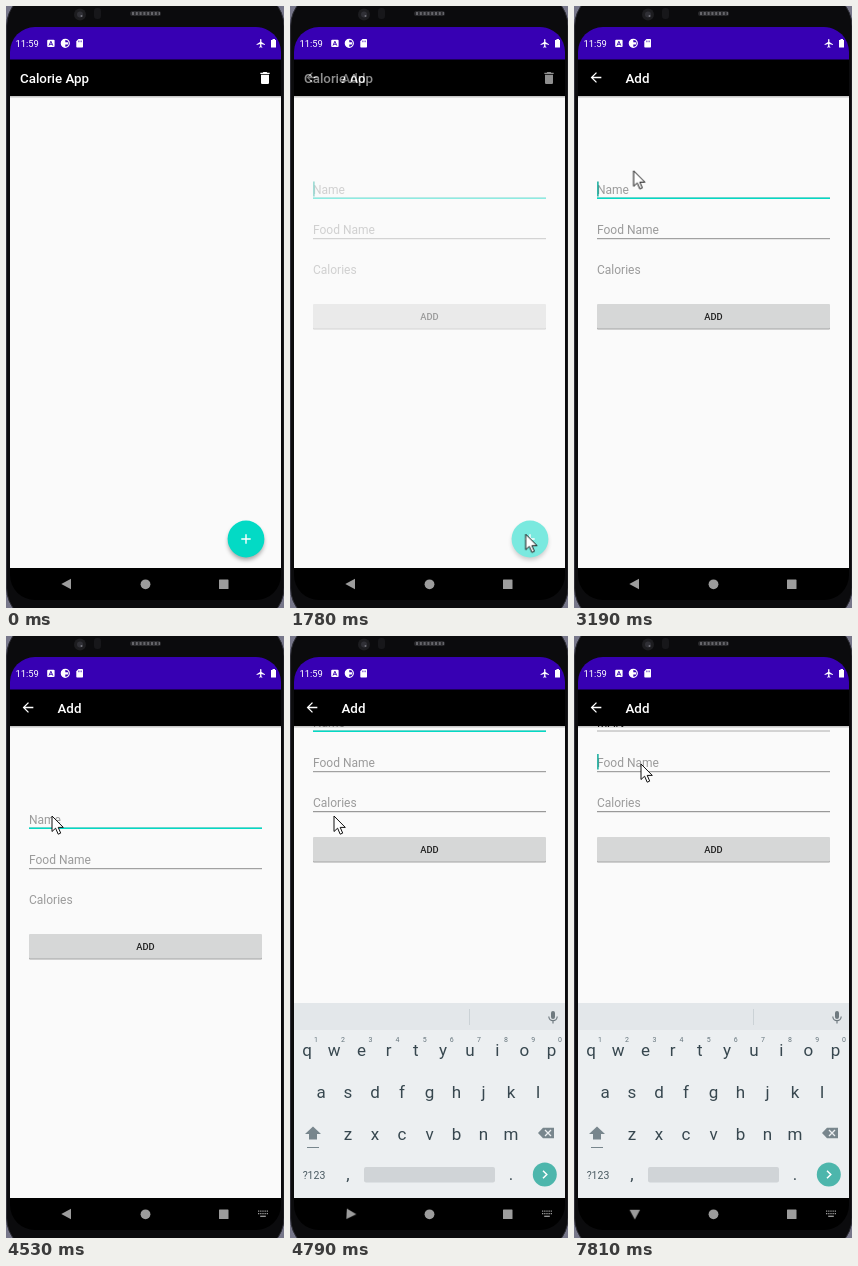
Write an HTML page that moves like this. It is 278 px wide and 602 px high and loops after 8000 ms.

```html
<!DOCTYPE html>
<html lang="en">
<head>
<meta charset="utf-8">
<title>Calorie App</title>
<style>
html, body { margin: 0; width: 100%; height: 100%; overflow: hidden; background: #0b0b0d; }
svg { display: block; width: 278px; height: 602px; font-family: Roboto, "Open Sans", sans-serif; }
.title { font-size: 13.33px; font-weight: 500; fill: #fff; }
.field { font-size: 12px; fill: #9b9b9b; }
.typed { font-size: 12px; fill: #212121; }
.mid { text-anchor: middle; }
.key { font-size: 17px; fill: #37474f; text-anchor: middle; }
.hint { font-size: 7px; fill: #66757d; text-anchor: middle; }
.word { font-size: 12px; fill: #6f7a80; text-anchor: middle; }

/* one loop is 8 s, so 1% is 80 ms */
.a { animation: 8s linear infinite; }
.s { animation: 8s step-end infinite; }
.mouse { animation-name: mouse; }
.press { animation-name: press; transform-origin: 240px 533px; }
.add { animation-name: add; }
.scroll { animation-name: scroll; }
.board { animation-name: board; }
.back { animation-name: back; transform-origin: 60.8px 578px; }
.ime { animation-name: ime; }
.blink { animation-name: blink; }
.blink2 { animation-name: blink2; }
.line3 { animation-name: line3; }
.focus { animation-name: focus; }
.name { animation-name: name; }
.t1 { animation-name: t1; }
.t2 { animation-name: t2; }
.t3 { animation-name: t3; }
.w1 { animation-name: w1; }
.w2 { animation-name: w2; }
.w3 { animation-name: w3; }
.dots { animation-name: dots; }

@keyframes mouse {
  0%, 5.5% { transform: translate(246px, 579px); opacity: 0; }
  5.6% { transform: translate(246px, 579px); opacity: 1; }
  7.6% { transform: translate(236px, 549px); }
  9.8% { transform: translate(226px, 523px); }
  11.5% { transform: translate(234px, 531px); }
  13%, 21.4% { transform: translate(239px, 537px); animation-timing-function: ease-in-out; }
  27.1%, 31.3% { transform: translate(167px, 346px); animation-timing-function: ease-in-out; }
  40.7% { transform: translate(58px, 162px); }
  43.2%, 55.7% { transform: translate(63px, 173px); }
  56.5% { transform: translate(46px, 180px); }
  57.4% { transform: translate(46px, 180px); }
  58.5%, 91% { transform: translate(44px, 180px); animation-timing-function: ease-in-out; }
  97.4%, 100% { transform: translate(67px, 128px); opacity: 1; }
}
@keyframes press {
  0%, 18% { transform: scale(.3); opacity: 0; }
  18.1% { transform: scale(.75); opacity: .25; }
  20.6% { transform: scale(1); opacity: .25; }
  23%, 100% { transform: scale(1); opacity: 0; }
}
@keyframes add { 0%, 21.2% { opacity: 0; } 23.6%, 100% { opacity: 1; } }
@keyframes scroll {
  0%, 58.2% { transform: translateY(0); }
  59.2%, 100% { transform: translateY(-97px); }
}
@keyframes board {
  0%, 57.2% { transform: translateY(196px); animation-timing-function: ease-out; }
  59.7%, 100% { transform: translateY(0); }
}
@keyframes back {
  0%, 57.5% { transform: rotate(0deg); }
  59.9% { transform: rotate(184deg); }
  62.4%, 100% { transform: rotate(270deg); }
}
@keyframes ime { 0% { opacity: 0; } 49.8% { opacity: 1; } }
@keyframes blink {
  0% { opacity: 1; } 31.3% { opacity: 0; } 37.5% { opacity: 1; } 43.2% { opacity: 0; }
  49.1% { opacity: 1; } 55.7% { opacity: 0; } 62.4% { opacity: 1; } 65% { opacity: 0; }
}
@keyframes blink2 { 0% { opacity: 0; } 95% { opacity: 1; } }
@keyframes line3 { 0% { opacity: 0; } 57.4% { opacity: 1; } }
@keyframes focus { 0% { opacity: 1; } 95% { opacity: 0; } }
@keyframes name { 0% { opacity: 1; } 64.9% { opacity: 0; } }
@keyframes t1 { 0% { opacity: 0; } 64.9% { opacity: 1; } 71.6% { opacity: 0; } }
@keyframes t2 { 0% { opacity: 0; } 71.6% { opacity: 1; } 84.2% { opacity: 0; } }
@keyframes t3 { 0% { opacity: 0; } 84.2% { opacity: 1; } }
@keyframes w1 { 0% { opacity: 0; } 67.4% { opacity: 1; } 73.3% { opacity: 0; } }
@keyframes w2 { 0% { opacity: 0; } 73.3% { opacity: 1; } 85.8% { opacity: 0; } }
@keyframes w3 { 0% { opacity: 0; } 85.8% { opacity: 1; } 95% { opacity: 0; } }
@keyframes dots { 0% { opacity: 0; } 68.2% { opacity: 1; } 95% { opacity: 0; } }
</style>
</head>
<body>
<svg viewBox="0 0 278 602" width="278" height="602">
  <defs>
    <clipPath id="screen"><rect x="4" y="21" width="271" height="573" rx="25"/></clipPath>
    <clipPath id="page"><rect x="4" y="90" width="271" height="472"/></clipPath>
    <linearGradient id="drop" x2="0" y2="1">
      <stop stop-color="#000" stop-opacity=".26"/><stop offset="1" stop-color="#000" stop-opacity="0"/>
    </linearGradient>
    <filter id="soft" x="-30%" y="-30%" width="160%" height="170%"><feGaussianBlur stdDeviation="2"/></filter>
    <filter id="thin" x="-5%" y="-20%" width="110%" height="150%"><feGaussianBlur stdDeviation=".7"/></filter>
  </defs>

  <!-- phone body -->
  <rect width="278" height="602" fill="#77778a"/>
  <rect x=".6" y="-14" width="277.4" height="630" rx="34" fill="#0b0b0d" stroke="#2c2c33"/>
  <circle cx="74" cy="8.500" r="6" fill="#1d1d20"/>
  <circle cx="74" cy="8.500" r="3" fill="#303036"/>
  <circle cx="75.500" cy="10" r="1" fill="#75757c"/>
  <rect x="88" y="2" width="7" height="11" rx="3" fill="#17171a"/>
  <rect x="124" y="5" width="31" height="5" rx="2.500" fill="#29292c"/>
  <path d="M126 7.500H154" stroke="#65656a" stroke-width="3" stroke-dasharray="2 1.800"/>

  <g clip-path="url(#screen)">
    <rect x="4" y="21" width="271" height="33" fill="#3700b3"/>
    <rect x="4" y="53.500" width="271" height="541" fill="#000"/>
    <rect x="4" y="90" width="271" height="472" fill="#fafafa"/>
  </g>

  <!-- status bar -->
  <g fill="#fff">
    <text x="9.500" y="41" font-size="9.400">11:59</text>
    <rect x="41.200" y="33.700" width="7.400" height="7.400" rx="1"/>
    <path d="M43 39.600L44.900 35.200L46.800 39.600M43.700 38.300H46.100" fill="none" stroke="#3700b3" stroke-width=".9"/>
    <circle cx="59.300" cy="37.300" r="4" fill="none" stroke="#fff" stroke-width="1.200"/>
    <path d="M59.300 33.300A4 4 0 0 0 59.300 41.300V38.500H62V36.300H59.300Z"/>
    <path d="M72.500 33H76.300Q77 33 77 33.700V40.700Q77 41.400 76.300 41.400H71Q70.300 41.400 70.300 40.700V35.200Z"/>
    <path d="M72.600 34.600V36.200M74 34.600V36.200M75.400 34.600V36.200" stroke="#3700b3" stroke-width=".6"/>
    <path transform="translate(249.700 32) scale(.44)" d="M21 16v-2l-8-5V3.500c0-.83-.67-1.500-1.500-1.500S10 2.670 10 3.500V9l-8 5v2l8-2.500V19l-2 1.500V22l3.500-1 3.500 1v-1.500L13 19v-5.500l8 2.500z"/>
    <path d="M266.500 33H269V34H270V41.500H265V34H266.500Z"/>
  </g>

  <!-- start page -->
  <text class="title" x="14" y="77">Calorie App</text>
  <path transform="translate(251 64) scale(.667)" fill="#fff" d="M6 19c0 1.100.9 2 2 2h8c1.100 0 2-.9 2-2V7H6v12zM19 4h-3.500l-1-1h-5l-1 1H5v2h14V4z"/>
  <circle cx="240" cy="536" r="18" opacity=".33" filter="url(#soft)"/>
  <circle cx="240" cy="533" r="18.400" fill="#03dac5"/>
  <circle class="a press" cx="240" cy="533" r="18.400" fill="#fff"/>
  <path d="M235.300 533H244.700M240 528.300V537.700" stroke="#fff" stroke-width="1.400"/>

  <!-- add page -->
  <g class="a add">
    <rect x="4" y="54" width="271" height="36" fill="#000"/>
    <path transform="translate(14 63.500) scale(.667)" fill="#fff" d="M20 11H7.830l5.590-5.590L12 4l-8 8 8 8 1.410-1.410L7.830 13H20v-2z"/>
    <text class="title" x="51.500" y="77">Add</text>
    <rect x="4" y="90" width="271" height="472" fill="#fafafa"/>
    <g clip-path="url(#page)">
      <g class="a scroll">
        <text class="field s name" x="23" y="187.500">Name</text>
        <text class="typed s t1" x="23" y="187.500">MA</text>
        <text class="typed s t2" x="23" y="187.500">MAr</text>
        <text class="typed s t3" x="23" y="187.500">MArt</text>
        <path d="M23 192H256" stroke="#a5a5a5" stroke-width=".9"/>
        <path class="s focus" d="M23 192.200H256" stroke="#03dac5" stroke-width="1.400"/>
        <rect class="s blink" x="23.200" y="175.500" width="1.400" height="15" fill="#03a796"/>
        <text class="field" x="23" y="228">Food Name</text>
        <path d="M23 232.700H256" stroke="#808080" stroke-width=".9"/>
        <rect class="s blink2" x="23.200" y="215" width="1.400" height="15.500" fill="#03a796"/>
        <text class="field" x="23" y="268">Calories</text>
        <path class="s line3" d="M23 272.700H256" stroke="#757575" stroke-width=".9"/>
        <rect x="23" y="299" width="233" height="24.500" rx="1" opacity=".35" filter="url(#thin)"/>
        <rect x="23" y="298" width="233" height="24.500" rx="1" fill="#d6d7d7"/>
        <text class="mid" x="139.500" y="313.700" font-size="9.330" font-weight="500" fill="#212121">ADD</text>
      </g>

      <!-- keyboard -->
      <g class="a board">
        <rect x="4" y="367" width="271" height="195" fill="#eceff1"/>
        <rect x="4" y="367" width="271" height="27" fill="#e3e7ea"/>
        <path d="M179.500 373V389" stroke="#cbd2d6"/>
        <g fill="#6f7a80">
          <rect x="261" y="375" width="4" height="8" rx="2"/>
          <path d="M258.800 380.500a4.200 4.200 0 0 0 8.400 0M263 384.700V387.500" fill="none" stroke="#6f7a80" stroke-width="1.200"/>
        </g>
        <g class="word s w1"><text x="63" y="386">May</text><text x="139.500" y="386">MA</text><text x="215.500" y="386">MAN</text></g>
        <g class="word s w2"><text x="63" y="386">Mar</text><text x="139.500" y="386">MAr</text><text x="215.500" y="386">mar</text></g>
        <g class="word s w3"><text x="63" y="386">Mart</text><text x="139.500" y="386">MArt</text><text x="215.500" y="386">mart</text></g>
        <path class="s dots" d="M135 392H144" stroke="#4b565c" stroke-width="2" stroke-dasharray="2 1.500"/>

        <text class="key" y="420" x="17 44.200 71.400 98.600 125.700 152.900 180 207.200 234.300 261.500">qwertyuiop</text>
        <text class="hint" y="406" x="26 53 80.400 107.500 134.600 161.800 189 216 243.200 270">1234567890</text>
        <text class="key" y="462" x="31 58 85 112 139.500 166.500 193.500 221 248">asdfghjkl</text>
        <text class="key" y="503.500" x="58 85 112 139.500 166.500 193.500 221">zxcvbnm</text>
        <path d="M23 490.500L31 498H27V503.500H19V498H15Z" fill="#78868d"/>
        <path d="M17 511.500H29" stroke="#78868d"/>
        <path d="M253 491.700H264V502.300H253L248 497Z" fill="#78868d"/>
        <path d="M255 494L261 500M261 494L255 500" stroke="#eceff1" stroke-width="1.300"/>
        <text class="mid" x="24" y="542.500" font-size="10.500" fill="#4a5a62">?123</text>
        <text class="key" y="544" x="58 221">,.</text>
        <rect x="74" y="531" width="131" height="15.500" rx="2" fill="#d0d4d7"/>
        <circle cx="254.800" cy="538.500" r="12" fill="#4db6ac"/>
        <path d="M253 534.700L256.800 538.500L253 542.300" fill="none" stroke="#fff" stroke-width="1.500"/>
      </g>
    </g>
  </g>
  <rect x="4" y="90" width="271" height="2.500" fill="url(#drop)"/>

  <!-- navigation bar -->
  <g fill="#9c9c9c">
    <path class="a back" d="M55.300 578L65 572.800V583.200Z"/>
    <circle cx="139.500" cy="578.300" r="4.900"/>
    <rect x="213" y="573.500" width="9.500" height="9.500" rx=".6"/>
  </g>
  <g class="s ime" stroke="#9c9c9c" stroke-width="1.300">
    <path d="M252 575.200H262M252 577.600H262" stroke-dasharray="1.300 .87"/>
    <path d="M254.200 580.300H259.800"/>
  </g>

  <path class="a mouse" d="M0 0V15.500L3.600 12.200L6.200 18.200L8.700 17.100L6.200 11.400H11.300Z" fill="#fff" stroke="#111" stroke-width="1" stroke-linejoin="round"/>
</svg>
</body>
</html>
```
